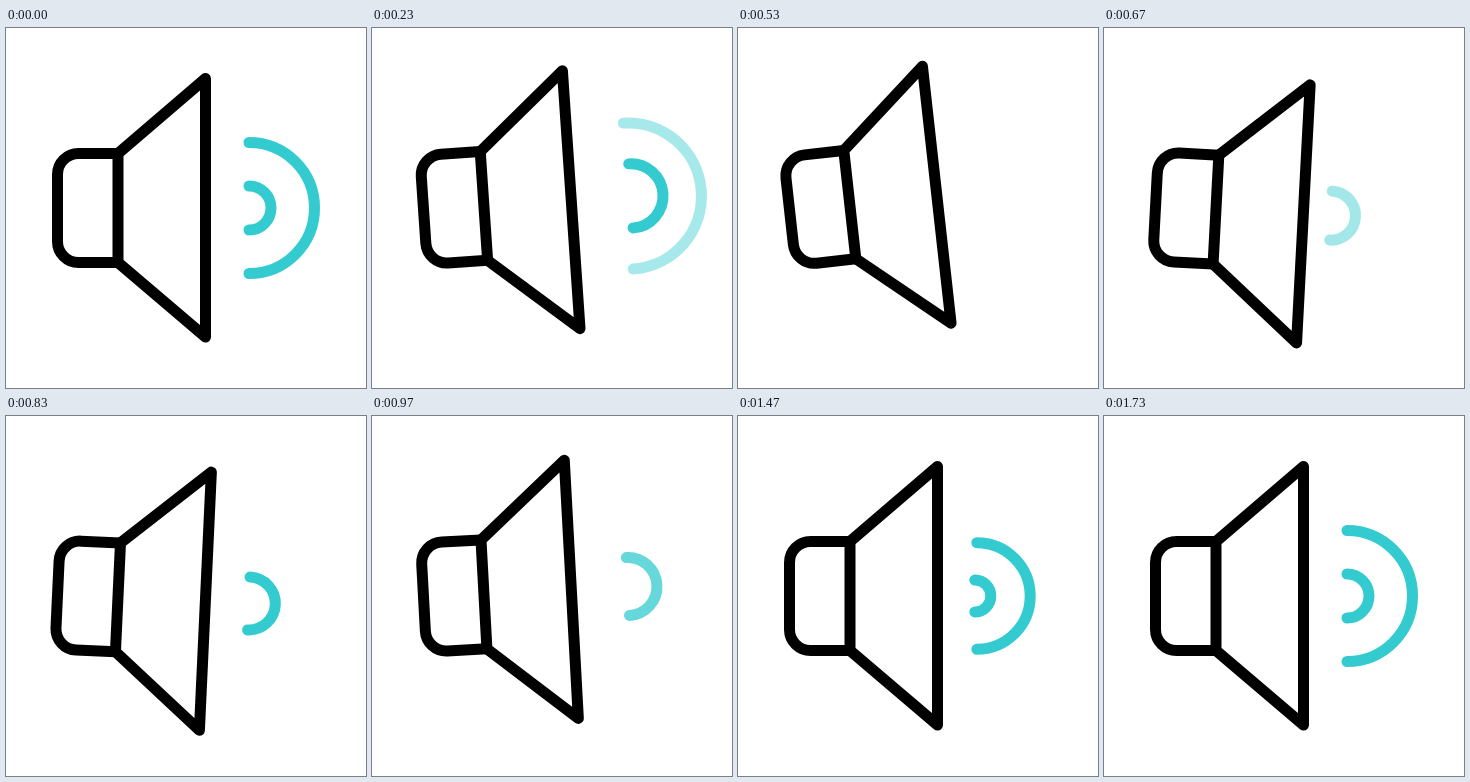
Recreate the animation shown at these times as an HTML page. Size 360 by 360 pixels, loop 2 s.

```html
<!DOCTYPE html>
<html lang="en">
<head>
<meta charset="utf-8">
<title>Speaker</title>
<style>
  html, body { margin: 0; width: 100%; height: 100%; overflow: hidden; background: #fff; }
  svg { display: block; width: 100vw; height: 100vh; }
  path { fill: none; stroke-width: 11; stroke-linecap: round; stroke-linejoin: round; }
  .body { stroke: #000; }
  .wave { stroke: #33cbcf; }
</style>
</head>
<body>
<svg viewBox="0 0 360 360">
  <g id="speaker">
    <path class="body" d="M112 125.5H72.5A21 21 0 0 0 51.5 146.5V213.5A21 21 0 0 0 72.5 234.5H112"/>
    <path class="body" d="M112 125.5L199.5 50.5V309L112 234.5Z"/>
    <path class="wave" id="outer"/>
    <path class="wave" id="inner"/>
    <path class="wave" id="pulse"/>
  </g>
</svg>
<script>
const LOOP = 2000, FPS = 30, LAST = 52;
const $ = id => document.getElementById(id);
const clamp = v => Math.max(0, Math.min(1, v));
const smooth = p => p * p * (3 - 2 * p);
const linear = p => p;

// Rows are [step, value, value, ...].
const TILT = [[0, 0], [13, -7], [15, -7.05], [22, 5.5], [30, -3.5], [36, 0]];
// Wave rows: [step, centre x, radius, opacity].
const OUTER_EXIT = [[0, 243, 65.5, 1], [3, 247, 68, 1], [10, 264, 77, 0]];
const INNER_EXIT = [[0, 243, 22, 1], [9, 264, 35, 1], [12, 272.5, 40.8, 0.6], [15, 280, 46, 0]];
const PULSE = [[17, 217, 23.5, 0], [20, 227.2, 24.5, 0.45], [24, 240, 26, 1], [27, 249, 27.5, 1],
  [29, 256.2, 29, 0.75], [32, 274, 36.5, 0.4], [35, 280, 40.5, 0.06], [36, 282, 42, 0]];

function sample(rows, f, ease) {
  if (f <= rows[0][0]) return rows[0].slice(1);
  const i = rows.findIndex(r => r[0] >= f);
  if (i < 0) return rows[rows.length - 1].slice(1);
  const a = rows[i - 1], b = rows[i];
  const p = ease((f - a[0]) / (b[0] - a[0]));
  return a.slice(1).map((v, k) => v + (b[k + 1] - v) * p);
}

function drawWave(el, [x, r, alpha]) {
  el.setAttribute("d", `M${x} ${180 - r}A${r} ${r} 0 0 1 ${x} ${180 + r}`);
  el.setAttribute("opacity", alpha);
}

// A returning wave grows from the cone's edge while it fades in.
function grow(f, radius, end, length, fadeStart) {
  const left = clamp((end - f) / length);
  const s = f >= LAST ? 1 : 1 - left * left;
  return [220.5 + 22.5 * s, radius * s, clamp((f - fadeStart) / 5)];
}

function draw(t) {
  const f = Math.min(LAST, Math.floor((t + 5) * FPS / 1000));
  $("speaker").setAttribute("transform", `rotate(${sample(TILT, f, smooth)[0]} 81.7 180)`);
  drawWave($("outer"), f < 30 ? sample(OUTER_EXIT, f, linear) : grow(f, 65.5, 53.6, 22.3, 34));
  drawWave($("inner"), f < 30 ? sample(INNER_EXIT, f, linear) : grow(f, 22, 53, 17.2, 37));
  drawWave($("pulse"), sample(PULSE, f, linear));
}

function tick() {
  draw(performance.now() % LOOP);
  requestAnimationFrame(tick);
}
tick();
</script>
</body>
</html>
```
